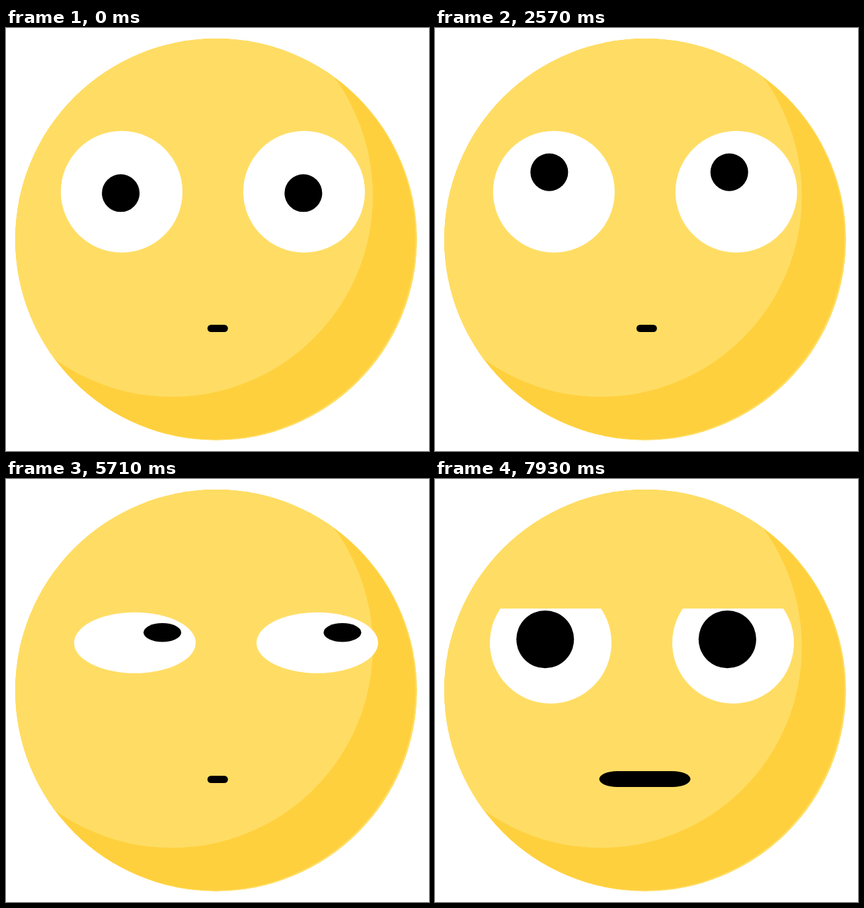
Animation of 640 by 640 pixels, one loop 8000 ms. Source, as an HTML page:

```html
<!DOCTYPE html>
<html lang="en">
<head>
<meta charset="utf-8">
<title>Rolling eyes</title>
<style>
  html, body { margin: 0; width: 100%; height: 100%; overflow: hidden; background: #fff; }
  svg { display: block; width: 100vw; height: 100vh; }
</style>
</head>
<body>
<svg viewBox="0 0 640 640">
  <defs>
    <clipPath id="faceClip"><circle cx="318" cy="320" r="304"/></clipPath>
    <clipPath id="lidClip"><rect id="lid" width="640" height="640"/></clipPath>
  </defs>
  <g clip-path="url(#faceClip)">
    <circle cx="318" cy="320" r="304" fill="#ffdd64"/>
    <circle cx="315.5" cy="318.5" r="304" fill="#ffd03e"/>
    <circle cx="251" cy="254" r="304" fill="#ffdd64"/>
  </g>
  <g id="eyes">
    <g clip-path="url(#lidClip)" fill="#fff">
      <circle class="white" cy="247.8" r="92"/>
      <circle class="white" cy="247.8" r="92"/>
    </g>
    <circle class="pupil"/>
    <circle class="pupil"/>
  </g>
  <rect id="mouth"/>
</svg>
<script>
const LOOP = 8000, STEP = LOOP / 112;
const EYE_Y = 247.8, EYE_GAP = 276;
const BLINK = { mid: 81 * STEP, half: 2 * STEP, min: 0.06 };

const rest = {
  eyeX: 175, pupilX: 173.6, pupilY: 249.8, pupilGap: 276.3, pupilR: 28.5, lid: 150,
  mouthX: 320.3, mouthY: 454.5, mouthW: 31, mouthH: 11, mouthRx: 5.5
};
const moves = [
  { from: 0, to: 920, pose: { pupilX: 152.5, pupilY: 218.7, pupilGap: 272.4 } },
  { from: 2110, to: 3710, pose: { eyeX: 195, pupilX: 236.6, pupilY: 216.7 } },
  { from: 5710, to: 7310, pose: { eyeX: 175, pupilX: 152.3, pupilY: 215 } },
  { from: 7390, to: 7930, pose: {
    pupilX: 166.7, pupilY: 242.6, pupilGap: 275.7, pupilR: 43.6, lid: 196,
    mouthX: 317.5, mouthY: 454, mouthW: 138, mouthH: 24, mouthRx: 27
  } }
];

const $ = id => document.getElementById(id);
const whites = document.querySelectorAll('.white');
const pupils = document.querySelectorAll('.pupil');
const clamp = (v, lo, hi) => Math.min(hi, Math.max(lo, v));
const set = (node, attrs) => {
  for (const name in attrs) node.setAttribute(name, attrs[name]);
};

// cubic-bezier(.25, 0, .69, 1)
function ease(p) {
  if (p <= 0 || p >= 1) return clamp(p, 0, 1);
  let lo = 0, hi = 1;
  for (let i = 0; i < 24; i++) {
    const s = (lo + hi) / 2, r = 1 - s;
    const x = 0.75 * s * r * r + 2.07 * s * s * r + s ** 3;
    if (x < p) lo = s; else hi = s;
  }
  return lo * lo * (3 - 2 * lo);
}

function poseAt(t) {
  const pose = { ...rest };
  for (const { from, to, pose: target } of moves) {
    const k = ease((t - from) / (to - from));
    for (const key in target) pose[key] += (target[key] - pose[key]) * k;
  }
  return pose;
}

function draw(t) {
  const p = poseAt(t);
  const open = clamp(Math.abs(t - BLINK.mid) / BLINK.half, BLINK.min, 1);
  whites.forEach((node, i) => set(node, { cx: p.eyeX + i * EYE_GAP }));
  pupils.forEach((node, i) => set(node, {
    cx: p.pupilX + i * p.pupilGap, cy: p.pupilY, r: p.pupilR
  }));
  set($('lid'), { y: p.lid });
  set($('eyes'), { transform: `translate(0 ${EYE_Y * (1 - open)}) scale(1 ${open})` });
  set($('mouth'), {
    x: p.mouthX - p.mouthW / 2, y: p.mouthY - p.mouthH / 2,
    width: p.mouthW, height: p.mouthH, rx: p.mouthRx, ry: p.mouthH / 2
  });
}

const start = performance.now();
function tick() {
  const t = (performance.now() - start) % LOOP;
  draw(Math.floor((t + 5) / STEP) % 112 * STEP);
  requestAnimationFrame(tick);
}
tick();
</script>
</body>
</html>
```
